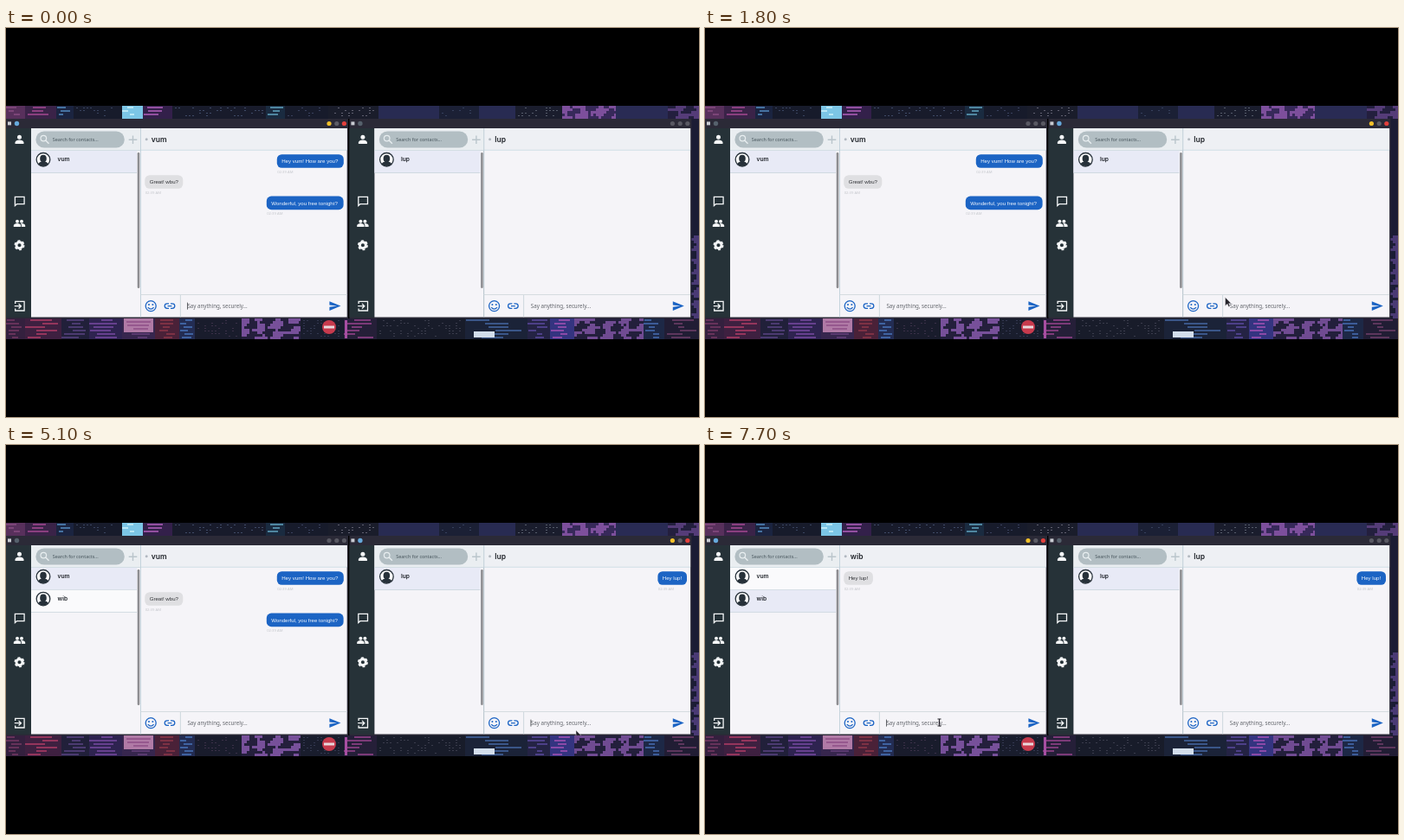
An HTML page for the animation above (8 s loop, 800 px wide and 450 px high).

```html
<!DOCTYPE html>
<html lang="en">
<head>
<meta charset="utf-8">
<title>Two chat windows</title>
<style>
  html, body { margin: 0; width: 100%; height: 100%; overflow: hidden; background: #000; }
  svg { display: block; width: 800px; height: 450px; }
  text { white-space: pre; }
  .ui { font-family: "Noto Sans", sans-serif; }
  .msg { font: 6.12px "Liberation Sans", Arial, sans-serif; }
  .name { font-family: Inter, sans-serif; font-weight: 600; fill: #20242a; }
  .stamp { font: 4.2px "Noto Sans", sans-serif; fill: #c3c5ca; }
</style>
</head>
<body>
<svg id="stage" viewBox="0 0 800 450" xmlns="http://www.w3.org/2000/svg"></svg>
<script>
const LOOP = 8000, STEP = 100, SHIFT = 396.4;
const LEFT_PEER = 'vum', RIGHT_PEER = 'lup', NEW_PEER = 'wib';
const BLUE = '#1c64c4';
const DRAFT = `Hey ${RIGHT_PEER}!`;
const stage = document.getElementById('stage');

function el(parent, tag, attrs = {}, text) {
  const node = document.createElementNS('http://www.w3.org/2000/svg', tag);
  for (const k in attrs) node.setAttribute(k, attrs[k]);
  if (text !== undefined) node.textContent = text;
  parent.appendChild(node);
  return node;
}
const group = (p, x = 0, y = 0) => el(p, 'g', { transform: `translate(${x} ${y})` });
const box = (p, x, y, width, height, fill, rx = 0) => el(p, 'rect', { x, y, width, height, fill, rx });
const dot = (p, cx, cy, r, fill) => el(p, 'circle', { cx, cy, r, fill });
const shape = (p, d, fill) => el(p, 'path', { d, fill });
const line = (p, d, stroke, w) => el(p, 'path', { d, stroke, 'stroke-width': w, fill: 'none' });
const show = (node, on) => node.setAttribute('display', on ? 'inline' : 'none');

// Pixel city behind the windows
let seed = 11;
const rnd = () => (seed = (seed * 16807) % 2147483647) / 2147483647;
const bar = (x, y, w, h) => `M${x} ${y}h${w}v${h}h${-w}z`;

const fills = {
  flat: () => '',
  // Facade with rows of lit windows between plain walls
  tower(x, y, w, h) {
    let d = '';
    for (let px = 3; px < w - 3; px += 4)
      for (let py = 2; py < h - 1; py += 3)
        if (rnd() < .3) d += bar(x + px, y + py, 2, 1);
    return d;
  },
  // Neon signs and ledges
  neon(x, y, w, h) {
    let d = '';
    for (let py = 1; py < h - 2; py += 4) {
      const from = Math.floor(rnd() * w * .5);
      d += bar(x + from, y + py, Math.floor((w - from) * (.3 + rnd() * .6)), 2);
    }
    return d;
  },
  // Clumps of blossom
  leaves(x, y, w, h) {
    let d = '';
    for (let px = 0; px < w; px += 3)
      for (let py = 0; py < h; py += 3)
        if (Math.sin(px * .31 + x) + Math.sin(py * .5 + px * .13) + rnd() > .5)
          d += bar(x + px, y + py, Math.min(3, w - px), Math.min(3, h - py));
    return d;
  }
};

function strip(y, h, zones) {
  let x = 0;
  for (const [end, base, accent, kind] of zones) {
    box(stage, x, y, end - x, h, base);
    shape(stage, fills[kind](x, y, end - x, h), accent);
    x = end;
  }
}

function city() {
  strip(90, 15, [
    [22, '#58305c', '#7c4578', 'neon'], [58, '#3a2348', '#8a3f7f', 'neon'],
    [78, '#1b2440', '#4571a0', 'neon'], [134, '#171b2b', '#39445f', 'tower'],
    [158, '#7cc6e6', '#b9e8f6', 'neon'], [192, '#33204a', '#9350a0', 'neon'],
    [300, '#181b2b', '#3f4a66', 'tower'], [322, '#1a2b40', '#4f86a0', 'neon'],
    [372, '#171b2b', '#39405c', 'tower'], [430, '#1a1d2b', '#606070', 'tower'],
    [500, '#282b52', '', 'flat'], [546, '#1b2035', '#36405c', 'tower'],
    [588, '#282b52', '', 'flat'], [642, '#1a1d2d', '#555b6a', 'tower'],
    [704, '#37295a', '#7d4f9c', 'leaves'], [764, '#292b54', '', 'flat'],
    [800, '#231f3e', '#553c78', 'leaves']
  ]);
  strip(336, 24, [
    [22, '#34203e', '#66325a', 'neon'], [64, '#3e2040', '#94355c', 'neon'],
    [96, '#21203a', '#4b3a70', 'neon'], [134, '#2e2350', '#66408e', 'neon'],
    [172, '#37264e', '#5a3a70', 'neon'], [200, '#4a2138', '#7d3144', 'neon'],
    [218, '#232c52', '#3f62a0', 'neon'], [272, '#191c2c', '#3a3048', 'tower'],
    [340, '#241f3c', '#77509a', 'leaves'], [390, '#191d2d', '#333850', 'tower'],
    [428, '#251f38', '#7c3a78', 'neon'], [530, '#181c2a', '#3a3c4c', 'tower'],
    [602, '#1b2338', '#3a5688', 'neon'], [628, '#242344', '#4d4088', 'neon'],
    [656, '#343480', '#8a4aa8', 'neon'], [736, '#231f3c', '#704b92', 'leaves'],
    [760, '#1d2846', '#3c5c98', 'neon'], [800, '#211d34', '#5c365c', 'neon']
  ]);
  box(stage, 791, 105, 9, 231, '#1b1c34');
  shape(stage, fills.leaves(791, 240, 9, 96), '#4a3a74');
  // Billboard, road sign and lamps
  box(stage, 136, 336, 34, 16, '#b07aa6');
  line(stage, 'M139 340h28M140 344h25M147 348h17', '#8d4d86', 1.3);
  dot(stage, 373, 346, 8, '#c73a4d');
  box(stage, 367, 344.5, 12, 3, '#e9d7dc');
  box(stage, 391, 338, 3, 21, '#a74fa2');
  box(stage, 540, 351, 24, 7, '#d3deec');
}

function avatar(p, x, y) {
  const g = group(p, x, y);
  el(g, 'circle', { r: 7.8, fill: '#fff', stroke: '#27313a', 'stroke-width': 1.3 });
  shape(g, 'M-5.8 5Q-5 2.4 0 2.2Q5 2.4 5.8 5Q3.4 7.6 0 7.6Q-3.4 7.6-5.8 5Z', '#27313a');
  el(g, 'ellipse', { cy: -1.2, rx: 3.8, ry: 4.4, fill: '#27313a' });
}

function sidebar(p) {
  const w = '#f5f7f8';
  box(p, 0, 116, 29, 218.5, '#263238');
  dot(p, 15.5, 126.3, 2.5, w);
  shape(p, 'M10.5 134v-1.5c0-4 10-4 10 0v1.5z', w);
  line(p, 'M10.4 205.6V195.3h10.7v8.4h-8.7z', w, 1.3);
  for (const x of [13, 18]) dot(p, x, 223.7, 2, w);
  shape(p, 'M8.8 230v-1.4c0-3.6 8.4-3.6 8.4 0v1.4zM18 230v-1.5q0-1.5-1-2.3c2.4-.4 5.2.6 5.2 2.4v1.4z', w);
  const gear = { cx: 15.5, cy: 251.3, fill: 'none', stroke: w };
  el(p, 'circle', { ...gear, r: 3.5, 'stroke-width': 2.9 });
  el(p, 'circle', { ...gear, r: 5.2, 'stroke-width': 1.7, 'stroke-dasharray': '2.9 2.545' });
  line(p, 'M10.7 319v-2.6h10.4v10.6H10.7v-2.6M9.8 321.7h7.3M14.6 318.9l2.8 2.8l-2.8 2.8', w, 1.3);
}

function contact(p, y, name) {
  const g = group(p, 0, y);
  const back = box(g, 29, 0, 122, 25.3, '#e8eaf6');
  box(g, 29, 25.1, 122, .8, '#c8d3dc');
  avatar(g, 43, 10.3);
  el(g, 'text', { x: 59.6, y: 11.9, class: 'name', 'font-size': 6.7 }, name);
  return { g, back };
}

function bubble(p, x, y, w, label, mine) {
  const g = group(p, x, y);
  box(g, 0, .2, w, 15.6, mine ? BLUE : '#dfdfe2', 5.5);
  el(g, 'text', { x: 5.4, y: 10.2, class: 'msg', fill: mine ? '#f3f7fd' : '#2d2f33' }, label);
  el(g, 'text', { x: .4, y: 21.8, class: 'stamp' }, '02:39 AM');
  return g;
}

function chatWindow(x, peer) {
  const g = group(stage, x);
  box(g, 0, 105, 395, 231, '#2b2a37');
  box(g, 2, 108.4, 4, 4, '#c9ccd3');
  const badge = dot(g, 12.5, 110.5, 2.7);
  const lights = [373, 381.8, 390.4].map(cx => dot(g, cx, 110.5, 2.6));
  sidebar(g);

  box(g, 29, 116, 126, 218.5, '#f5f4f8');
  box(g, 29, 116, 126, 26, '#eaeef1');
  box(g, 34.4, 119.5, 102.4, 19, '#b2bec3', 9.5);
  el(g, 'circle', { cx: 43.3, cy: 127.6, r: 3.3, fill: 'none', stroke: '#e8eef0', 'stroke-width': 1.2 });
  line(g, 'M45.7 130l3.8 3.8', '#e8eef0', 1.4);
  el(g, 'text', { x: 53.8, y: 131, class: 'ui', 'font-size': 5.4, fill: '#46545b' }, 'Search for contacts...');
  line(g, 'M146.5 124.5v9.6M141.7 129.3h9.6', '#bac5cb', 1.4);
  box(g, 29, 141.4, 126, .7, '#c6d5dc');
  const rows = [contact(g, 142, peer)];

  box(g, 155, 116, 238.7, 218.5, '#f5f4f8');
  box(g, 155, 116, 238.7, 25, '#eef0f4');
  box(g, 155, 140.8, 238.7, .8, '#c6dbe2');
  box(g, 155, 116, .8, 218.5, '#b9ccd6');
  box(g, 151.7, 144, 2.6, 157, '#8d8d91', 1.3);
  dot(g, 162.2, 128.8, 1.5, '#b2b8c0');
  const title = el(g, 'text', { x: 167.8, y: 132, class: 'name', 'font-size': 8.5 }, peer);

  box(g, 155, 308.2, 238.7, .8, '#cdd6db');
  box(g, 200.9, 309, .8, 25.5, '#c3d0d8');
  el(g, 'circle', { cx: 167.2, cy: 321.6, r: 6, fill: 'none', stroke: BLUE, 'stroke-width': 1.3 });
  dot(g, 165, 319.9, 1, BLUE);
  dot(g, 169.4, 319.9, 1, BLUE);
  line(g, 'M163.8 323.2q3.4 4 6.8 0', BLUE, 1.2);
  line(g, 'M188 318.8h-2a2.8 2.8 0 0 0 0 5.6h2M190 318.8h2a2.8 2.8 0 0 1 0 5.6h-2M186.6 321.6h4.8', BLUE, 1.3);
  shape(g, 'M373.4 316.3L386.4 321.6L373.4 327V322.7L382 321.6L373.4 320.5Z', BLUE);
  const field = el(g, 'text', { x: 209.4, y: 324, class: 'ui', 'font-size': 6.2 });
  const caret = box(g, 209, 317.6, .7, 8, '#25282c');

  function focus(on) {
    badge.setAttribute('fill', on ? '#66a9dc' : '#56616c');
    const colors = on ? ['#f2c029', '#5d5d66', '#e2403c'] : ['#595963', '#595963', '#595963'];
    lights.forEach((l, i) => l.setAttribute('fill', colors[i]));
  }
  function input(value, caretOn) {
    field.textContent = value || 'Say anything, securely...';
    field.setAttribute('fill', value ? '#25282c' : '#63666c');
    caret.setAttribute('x', 209.2 + (value ? field.getComputedTextLength() + .6 : 0));
    show(caret, caretOn);
  }
  return { g, rows, title, focus, input };
}

city();
const left = chatWindow(0, LEFT_PEER);
const right = chatWindow(SHIFT, RIGHT_PEER);
left.rows.push(contact(left.g, 167.8, NEW_PEER));

const oldChat = group(left.g);
bubble(oldChat, 312.8, 146, 77, `Hey ${LEFT_PEER}! How are you?`, true);
bubble(oldChat, 160.3, 170, 44, 'Great! wbu?', false);
bubble(oldChat, 300.8, 194.4, 88.8, 'Wonderful, you free tonight?', true);
const received = bubble(left.g, 160.3, 146, 33.6, DRAFT, false);
const sent = bubble(right.g, 356, 146, 33.6, DRAFT, true);

// Pointer
const clip = el(el(stage, 'defs'), 'clipPath', { id: 'desk' });
box(clip, 0, 90, 800, 246, '#000');
const layer = el(stage, 'g', { 'clip-path': 'url(#desk)' });
const arrow = el(layer, 'path', {
  d: 'M0 0V10L2.5 7.8L4 11L5.6 10.2L4.2 7.2H7Z', fill: '#25232b', stroke: '#e4e4e8', 'stroke-width': .5
});
const beam = line(layer, 'M-2-4H2M0-4V4M-2 4H2', '#25232b', 1.1);

const route = [
  [600, 424, 214], [1000, 476, 158], [1200, 476, 158], [1800, 600.5, 311.5],
  [2600, 658, 330], [5400, 658, 330], [5600, 635.5, 321], [6400, 635.5, 321],
  [6800, 84, 180], [6900, 84, 180], [7000, 236, 246], [7200, 236, 246],
  [7300, 269, 300], [7400, 269, 300], [7500, 270.5, 321]
];
function pointer(t) {
  const i = route.findIndex(p => p[0] > t);
  if (i === 0) return null;
  if (i < 0) return route[route.length - 1].slice(1);
  const [t0, x0, y0] = route[i - 1], [t1, x1, y1] = route[i];
  const k = (t - t0) / (t1 - t0);
  return [x0 + (x1 - x0) * k, y0 + (y1 - y0) * k];
}

function typed(t) {
  if (t < 3500 || t >= 4800) return '';
  const n = t < 3800 ? 1 + (t - 3500) / 100 : 3 + Math.floor((t - 3800) / 130);
  return DRAFT.slice(0, Math.min(n, DRAFT.length));
}

function render(time) {
  const t = Math.floor(time / STEP) * STEP;
  const rightOn = t >= 600 && t < 6600;
  const opened = t >= 7000;
  const blink = t % 1000 < 500;
  left.focus(!rightOn);
  right.focus(rightOn);

  show(left.rows[1].g, t >= 4900);
  left.rows.forEach((row, i) => row.back.setAttribute('fill', (i === 1) === opened ? '#e8eaf6' : '#fafafc'));
  left.title.textContent = opened ? NEW_PEER : LEFT_PEER;
  show(oldChat, !opened);
  show(received, opened);
  show(sent, t >= 4800);

  const text = typed(t);
  left.input('', t < 500 || t >= 7500);
  right.input(text, text !== '' || (t >= 4800 && t < 6600 && blink));

  const pos = pointer(t);
  const inField = (t >= 5600 && t <= 6400) || t >= 7500;
  show(arrow, pos && !inField);
  show(beam, pos && inField);
  if (pos) (inField ? beam : arrow).setAttribute('transform', `translate(${pos[0]} ${pos[1]})`);
}

const start = performance.now();
function tick() {
  render((performance.now() - start) % LOOP);
  requestAnimationFrame(tick);
}
tick();
</script>
</body>
</html>
```
